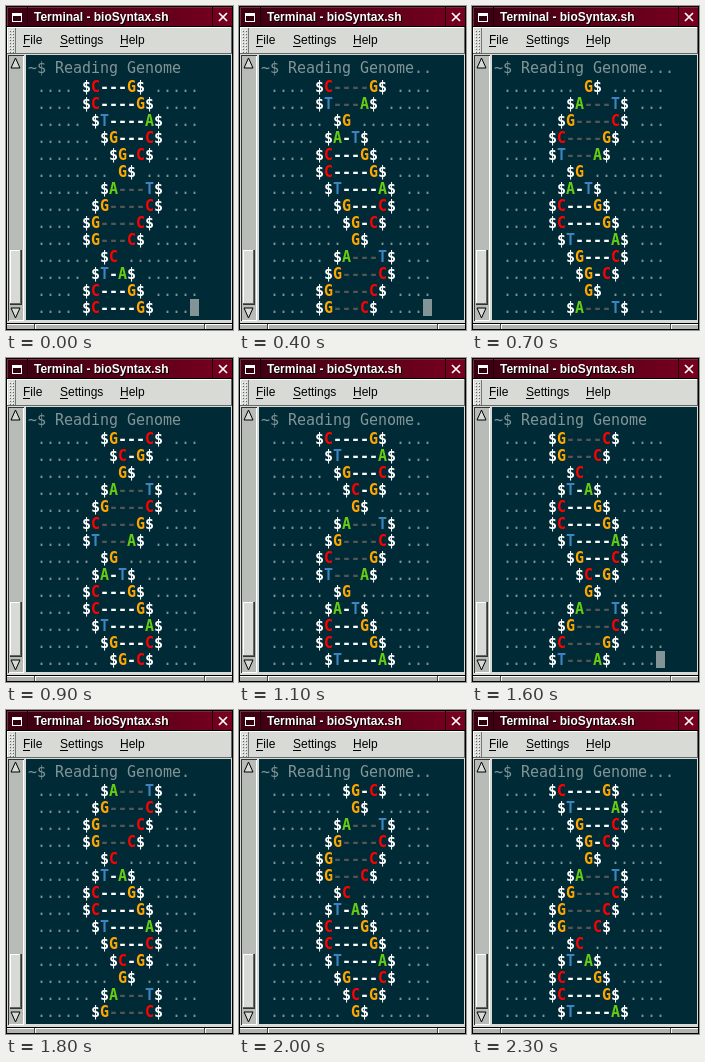
Write an HTML page with a canvas that moves like this. It is 227 px wide and 324 px high and loops after 2.4 s.

```html
<!DOCTYPE html>
<html lang="en">
<head>
<meta charset="utf-8">
<title>Terminal</title>
<style>
html, body { margin: 0; width: 227px; height: 324px; overflow: hidden; background: #000; }
canvas { display: block; }
</style>
</head>
<body>
<canvas width="227" height="324"></canvas>
<script>
const ctx = document.querySelector('canvas').getContext('2d');
const LOOP = 2400, STEP = 100, ROWS = 14, LAST_COL = 18;
const LEFT = 22, CELL = 9, LINE = 17, PROMPT_Y = 67, FIRST_Y = 86;
const SANS = '"Liberation Sans", Arial, sans-serif';
const MONO = '15px "DejaVu Sans Mono", monospace';
const GREY = '#839496', DIM = '#555555', FACE = '#d8dad6';
const INK = { $: '#ffffff', C: '#ff0000', G: '#ffa500', A: '#66cc11', T: '#3c85c0' };

// One helix turn is 12 rows; two turns carry different bases.
const starts = [6, 6, 7, 8, 9, 10, 8, 7, 6, 6, 8, 7];
const pairs = ('$C---G$ $C----G$ $T----A$ $G---C$ $G-C$ G$ $A---T$ $G----C$ $G----C$ $G---C$ $C $T-A$ ' +
  '$C---G$ $C----G$ $T----A$ $G---C$ $C-G$ G$ $A---T$ $G----C$ $C----G$ $T---A$ $G $A-T$').split(' ');

function rect(color, x, y, w, h) {
  ctx.fillStyle = color;
  ctx.fillRect(x, y, w, h);
}

function bevel(x, y, w, h, face = FACE) {
  rect('#666', x, y, w, h);
  rect('#fff', x, y, w - 1, h - 1);
  rect(face, x + 1, y + 1, w - 2, h - 2);
}

function label(text, x, y, font, color) {
  ctx.font = font;
  ctx.fillStyle = color;
  ctx.fillText(text, x, y);
}

function arrow(y, dir) {
  ctx.beginPath();
  ctx.moveTo(9.5, y - 5 * dir);
  ctx.lineTo(14, y + 5 * dir);
  ctx.lineTo(5, y + 5 * dir);
  ctx.closePath();
  ctx.fillStyle = FACE;
  ctx.strokeStyle = '#000';
  ctx.lineWidth = 1;
  ctx.fill();
  ctx.stroke();
}

function drawTitleBar() {
  const shade = ctx.createLinearGradient(0, 0, 227, 0);
  shade.addColorStop(0, '#3a0010');
  shade.addColorStop(1, '#78001f');
  rect('#000', 0, 0, 227, 21);
  rect('#802840', 1, 1, 225, 19);
  rect(shade, 2, 2, 224, 18);
  for (const x of [21, 206]) rect('#180006', x, 1, 1, 19);
  rect('#fff', 6, 7, 10, 9);
  rect('#30000c', 7, 10, 8, 5);
  ctx.strokeStyle = '#fff';
  ctx.lineWidth = 1.7;
  ctx.beginPath();
  ctx.moveTo(213, 7); ctx.lineTo(221, 15);
  ctx.moveTo(221, 7); ctx.lineTo(213, 15);
  ctx.stroke();
  const font = `bold 12px ${SANS}`;
  label('Terminal - bioSyntax.sh', 29, 16, font, '#000');
  label('Terminal - bioSyntax.sh', 28, 15, font, '#fff');
}

function drawMenu() {
  bevel(1, 21, 225, 27);
  for (let y = 24; y < 46; y += 3) {
    for (const x of [3, 6]) {
      rect('#fff', x, y, 1, 1);
      rect('#666', x + 1, y + 1, 1, 1);
    }
  }
  rect('#777', 9, 22, 1, 25);
  const items = [['File', 17, 7], ['Settings', 54, 8], ['Help', 114, 8]];
  for (const [name, x, w] of items) {
    label(name, x, 38, `12px ${SANS}`, '#000');
    rect('#000', x, 40, w, 1);
  }
}

function drawFrame() {
  rect('#000', 0, 0, 227, 324);
  rect(FACE, 1, 21, 225, 302);
  drawTitleBar();
  drawMenu();
  rect('#333', 2, 49, 16, 266);
  rect('#fff', 3, 50, 15, 265);
  rect('#b8bcb6', 3, 50, 14, 264);
  arrow(57, 1);
  arrow(307, -1);
  rect('#333', 4, 244, 12, 55);
  bevel(4, 244, 11, 54);
  rect('#002b36', 20, 49, 205, 265);
  rect('#000', 1, 317, 225, 1);
  rect('#fff', 1, 318, 225, 1);
  rect('#b0b4ae', 1, 319, 225, 4);
  for (const x of [28, 198]) {
    rect('#444', x, 318, 1, 5);
    rect('#fff', x + 1, 318, 1, 5);
  }
}

function put(text, col, y, color, bold) {
  const font = (bold ? 'bold ' : '') + MONO;
  [...text].forEach((ch, i) => label(ch, LEFT + (col + i) * CELL, y, font, color));
}

function drawRow(index, y) {
  const turn = index % 12, start = starts[turn], pair = pairs[index];
  const end = start + pair.length;
  const dash = turn > 5 && turn < 10 ? DIM : '#ffffff';
  put('.'.repeat(start - 2), 1, y, GREY);
  [...pair].forEach((ch, i) => put(ch, start + i, y, INK[ch] || dash, true));
  put('.'.repeat(LAST_COL - end), end + 1, y, GREY);
}

function draw(now) {
  const t = now % LOOP;
  const step = Math.floor(t / STEP);
  drawFrame();
  put('~$ Reading Genome' + '.'.repeat(Math.floor(step / 2) % 4), 0, PROMPT_Y, GREY);
  for (let r = 0; r < ROWS; r++) drawRow((r - step + 24) % 24, FIRST_Y + r * LINE);
  if (t % 1200 < 600) rect(GREY, LEFT + LAST_COL * CELL, 293, CELL, LINE);
}

const begin = performance.now();
function tick() {
  draw(performance.now() - begin);
  requestAnimationFrame(tick);
}
tick();
</script>
</body>
</html>
```
